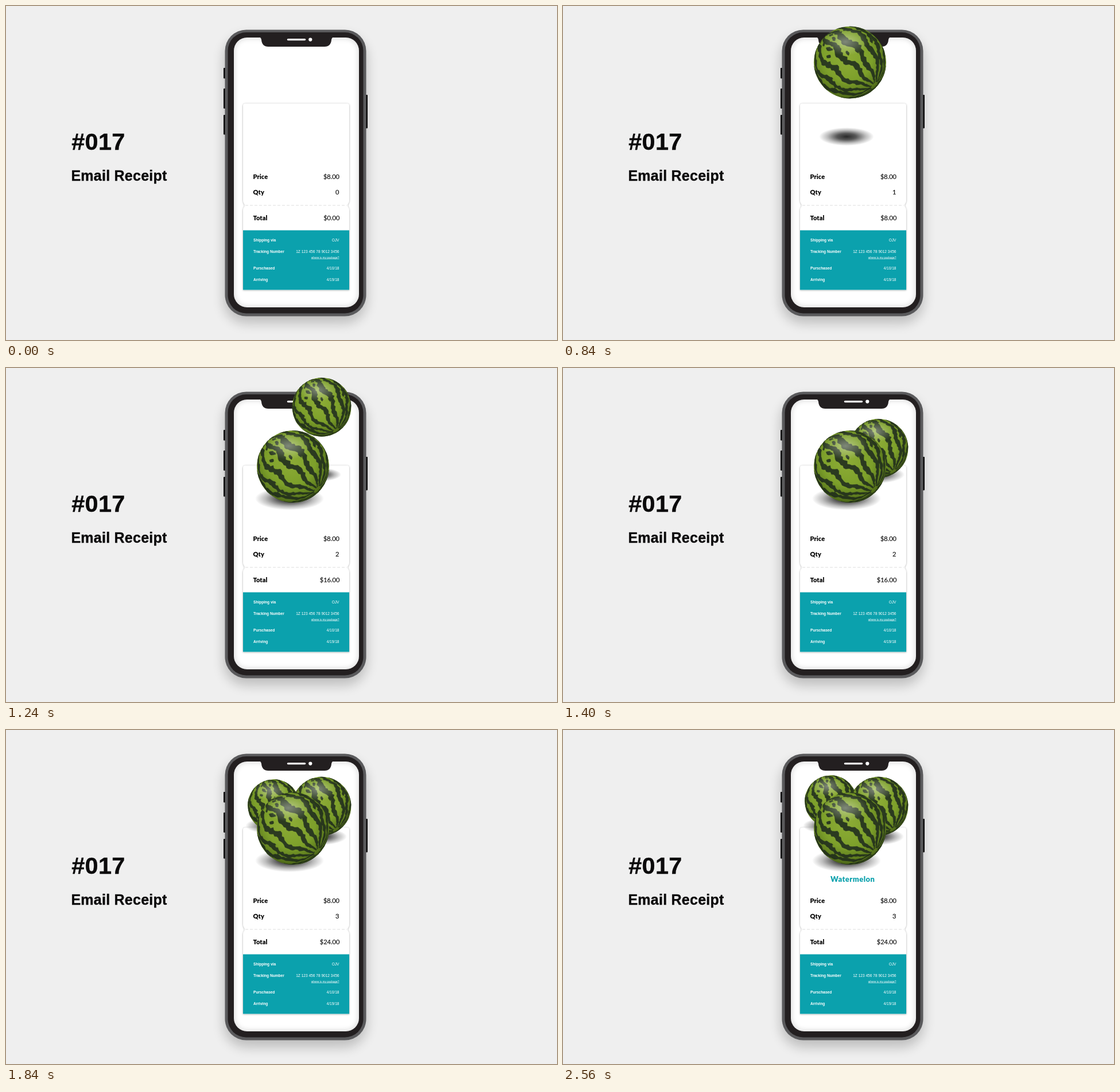
These frames come from a looping animation (960x583 px, 4.78 s). An HTML page:

```html
<!DOCTYPE html>
<html lang="en">
<head>
<meta charset="utf-8">
<title>Email Receipt</title>
<style>
html, body { margin: 0; height: 100%; overflow: hidden; background: #efefef; }
svg { display: block; width: 100%; height: 100%; }

.head { font-family: "Liberation Sans", Arial, sans-serif; font-weight: 700; fill: #0b0a0b; stroke: #0b0a0b; stroke-width: .4; stroke-linejoin: round; }
.row { font: 11px Lato, sans-serif; fill: #111; stroke: #111; stroke-width: .2; }
.row .label { font-weight: 900; fill: #000; stroke: none; letter-spacing: .1px; }
.small { font: 6.58px "Liberation Sans", Arial, sans-serif; fill: #fff; }
.small .label { font-weight: 700; }
.end { text-anchor: end; }
.title { font: 900 13px Lato, sans-serif; letter-spacing: .45px; text-anchor: middle; fill: #0ba1ad; }
</style>
</head>
<body>
<svg viewBox="0 0 960 583" preserveAspectRatio="none">
  <defs>
    <filter id="soft" x="-30%" y="-30%" width="160%" height="160%"><feGaussianBlur stdDeviation="10"/></filter>
    <filter id="blur" x="-10%" y="-10%" width="120%" height="120%"><feGaussianBlur stdDeviation="5"/></filter>
    <filter id="lift" x="-10%" y="-10%" width="120%" height="120%">
      <feDropShadow dx="0" dy="0.5" stdDeviation="1.8" flood-color="#000" flood-opacity=".38"/>
    </filter>
    <clipPath id="screen"><rect x="397" y="55" width="218" height="471" rx="23"/></clipPath>
    <clipPath id="ball"><circle r="63"/></clipPath>
    <radialGradient id="dark">
      <stop offset="0" stop-color="#000" stop-opacity=".84"/>
      <stop offset=".35" stop-color="#000" stop-opacity=".66"/>
      <stop offset=".7" stop-color="#000" stop-opacity=".26"/>
      <stop offset="1" stop-color="#000" stop-opacity="0"/>
    </radialGradient>
    <radialGradient id="rind" cx=".45" cy=".42" r=".6">
      <stop offset="0" stop-color="#8dac36"/>
      <stop offset=".6" stop-color="#7c9f2a"/>
      <stop offset="1" stop-color="#65861f"/>
    </radialGradient>
    <radialGradient id="shade" cx=".47" cy=".42" r=".62">
      <stop offset=".55" stop-color="#101c05" stop-opacity="0"/>
      <stop offset=".85" stop-color="#101c05" stop-opacity=".2"/>
      <stop offset="1" stop-color="#101c05" stop-opacity=".48"/>
    </radialGradient>
    <radialGradient id="shine">
      <stop offset="0" stop-color="#fff" stop-opacity=".4"/>
      <stop offset="1" stop-color="#fff" stop-opacity="0"/>
    </radialGradient>
    <path id="stripes" fill="#2b3a20" stroke="#2b3a20" stroke-width=".6" stroke-linejoin="round"/>
    <g id="skin" clip-path="url(#ball)">
      <circle r="63" fill="url(#rind)"/>
      <use href="#stripes"/>
    </g>
    <g id="light">
      <circle r="63" fill="url(#shade)"/>
      <ellipse cx="-8" cy="-36" rx="40" ry="24" fill="url(#shine)"/>
    </g>
  </defs>

  <rect width="960" height="583" fill="#efefef"/>

  <g class="head">
    <text x="114.2" y="250.8" font-size="41.5" letter-spacing=".3">#017</text>
    <text x="113.4" y="304.6" font-size="25" letter-spacing=".25">Email Receipt</text>
  </g>

  <!-- phone -->
  <rect x="379" y="52" width="250" height="502" rx="40" fill="#000" opacity=".2" filter="url(#soft)"/>
  <g fill="#0d0c0d">
    <rect x="379" y="108" width="4" height="18.5" rx="1"/>
    <rect x="379" y="144" width="4" height="35" rx="1"/>
    <rect x="379" y="190" width="4" height="34.5" rx="1"/>
    <rect x="626" y="155" width="4" height="58.5" rx="1"/>
  </g>
  <rect x="381.5" y="41.5" width="246" height="500" rx="37" fill="#5a5a5c"/>
  <rect x="386.5" y="46" width="236" height="490.5" rx="32" fill="#231f20"/>
  <rect x="397" y="55" width="218" height="471" rx="23" fill="#fff"/>
  <g clip-path="url(#screen)">
    <rect x="395" y="53" width="222" height="475" rx="25" fill="none" stroke="#000" stroke-opacity=".22" stroke-width="5" filter="url(#blur)"/>
  </g>
  <path d="M441 54H571Q567.5 55 567 59Q566 71 555 71H457Q446 71 445 59Q444.5 55 441 54Z" fill="#231f20"/>
  <path d="M491.5 58.6H520.5" stroke="#fff" stroke-width="3.4" stroke-linecap="round"/>
  <circle cx="530.3" cy="58.6" r="3.1" fill="#fff"/>

  <!-- receipt -->
  <path filter="url(#lift)" fill="#fff" d="M417 170.5H594a4 4 0 0 1 4 4V338C598 344 595 345 595 348C595 351 598 352 598 358V495.5H413V358C413 352 416 351 416 348C416 345 413 344 413 338V174.5a4 4 0 0 1 4-4Z"/>
  <path d="M417 348H594" stroke="#dedede" stroke-dasharray="5 3"/>
  <rect x="413" y="391.5" width="185" height="104" fill="#0ba1ad"/>

  <g class="row">
    <g class="label">
      <text x="430.5" y="301.8">Price</text>
      <text x="430.5" y="328.5">Qty</text>
      <text x="430.5" y="374">Total</text>
    </g>
    <g class="end">
      <text x="581" y="302.3">$8.00</text>
      <text id="qty" x="580.5" y="329">0</text>
      <text id="total" x="581.3" y="374">$0.00</text>
    </g>
  </g>

  <g class="small">
    <g class="label">
      <text x="431" y="410.5">Shipping via</text>
      <text x="431" y="430.5">Tracking Number</text>
      <text x="431" y="459.8">Purschased</text>
      <text x="431" y="479.8">Arriving</text>
    </g>
    <g class="end">
      <text x="580.5" y="410.5">OJV</text>
      <text x="580.5" y="430.5">1Z 123 456 78 9012 3456</text>
      <text x="580.5" y="440.5" font-size="4.9" text-decoration="underline">where is my package?</text>
      <text x="580.5" y="459.8">4/10/18</text>
      <text x="580.5" y="479.8">4/19/18</text>
    </g>
  </g>

  <text id="title" class="title" x="504.7" y="264.8" opacity="0">Watermelon</text>
  <g id="melons"></g>
</svg>

<script>
const R = 63, TAU = Math.PI * 2, LOOP = 4780;
const byId = id => document.getElementById(id);
let seed = 17;
const rand = () => (seed = (seed * 16807) % 2147483647) / 2147483647;

// Sphere axis through the melon's pole, and two vectors across it
const unit = v => v.map(c => c / Math.hypot(...v));
const cross = (a, b) => [a[1] * b[2] - a[2] * b[1], a[2] * b[0] - a[0] * b[2], a[0] * b[1] - a[1] * b[0]];
const axis = unit([.68, .64, .36]);
const side = unit(cross(axis, [0, 0, 1]));
const up = cross(axis, side);

function point(lat, lon) {
  const s = Math.sin(lat), c = Math.cos(lat);
  return axis.map((a, i) => a * c + s * (side[i] * Math.cos(lon) + up[i] * Math.sin(lon)));
}

// A ragged band along one meridian, front side only
function band(lon, from, to, width, rough, taper) {
  const left = [], right = [], steps = Math.max(5, Math.round((to - from) * 17));
  const phase = rand() * TAU;
  for (let i = 0; i <= steps; i++) {
    const k = i / steps, lat = from + (to - from) * k;
    const mid = lon + .07 * Math.sin(lat * 7 + phase);
    const w = width * (taper ? Math.sin(Math.PI * k) : 1);
    const edge = () => w * (1 - rough / 2 + rough * rand());
    const a = point(lat, mid - edge()), b = point(lat, mid + edge());
    if (a[2] + b[2] < 0) continue;
    left.push(a);
    right.unshift(b);
  }
  const pts = left.concat(right).map(p => (p[0] * R).toFixed(1) + " " + (p[1] * R).toFixed(1));
  return pts.length > 3 ? "M" + pts.join("L") + "Z" : "";
}

let d = "";
const count = 15;
for (let i = 0; i < count; i++) {
  d += band((i + .3 * rand()) * TAU / count, .13, 2.95, .075 + .03 * rand(), 1.05, false);
}
for (let i = 0; i < 60; i++) {
  const lat = 1 + rand() * 1.6;
  d += band(rand() * TAU, lat, lat + .1 + .16 * rand(), .055, .9, true);
}
byId("stripes").setAttribute("d", d);

// Resting places, in order of landing
const melons = [
  { x: 500, y: 172, size: 1, turn: 0, drop: 360, shadow: [494, 228, 60, 20] },
  { x: 550, y: 133, size: .817, turn: 15, drop: 317, shadow: [546, 186, 48, 15] },
  { x: 466.5, y: 124.5, size: .722, turn: 24, drop: 398, shadow: [463, 167, 45, 14] },
];
melons.forEach((m, i) => {
  m.start = 640 + 400 * i;
  const [x, y, rx, ry] = m.shadow;
  byId("melons").insertAdjacentHTML("afterbegin", `
    <g transform="translate(${x} ${y})"><ellipse id="shadow${i}" rx="${rx}" ry="${ry}" fill="url(#dark)"/></g>
    <g id="melon${i}"><use href="#skin" transform="rotate(${m.turn})"/><use href="#light"/></g>`);
});

const clamp = v => Math.min(1, Math.max(0, v));
const smooth = v => v * v * (3 - 2 * v);

// 0 = above the stage, 1 = at rest, with one small overshoot
function fall(ms) {
  const peak = 1.0264, half = 290;
  return peak * smooth(clamp(ms / half)) - (peak - 1) * smooth(clamp(ms / half - 1));
}

function draw(t) {
  melons.forEach((m, i) => {
    const p = fall(t - m.start);
    byId("melon" + i).setAttribute("transform", `translate(${m.x} ${m.y + (p - 1) * m.drop}) scale(${m.size})`);
    byId("shadow" + i).setAttribute("transform", `scale(${p})`);
  });

  const qty = melons.filter(m => t >= m.start).length;
  byId("qty").textContent = qty;
  byId("total").textContent = "$" + (qty * 8).toFixed(2);

  const rest = (1 - clamp((t - 2140) / 420)) ** 2;
  byId("title").setAttribute("opacity", 1 - rest);
  byId("title").setAttribute("transform", `translate(0 ${8.5 * rest})`);
}

const begin = performance.now();
function tick() {
  draw((performance.now() - begin) % LOOP);
  requestAnimationFrame(tick);
}
tick();
</script>
</body>
</html>
```
